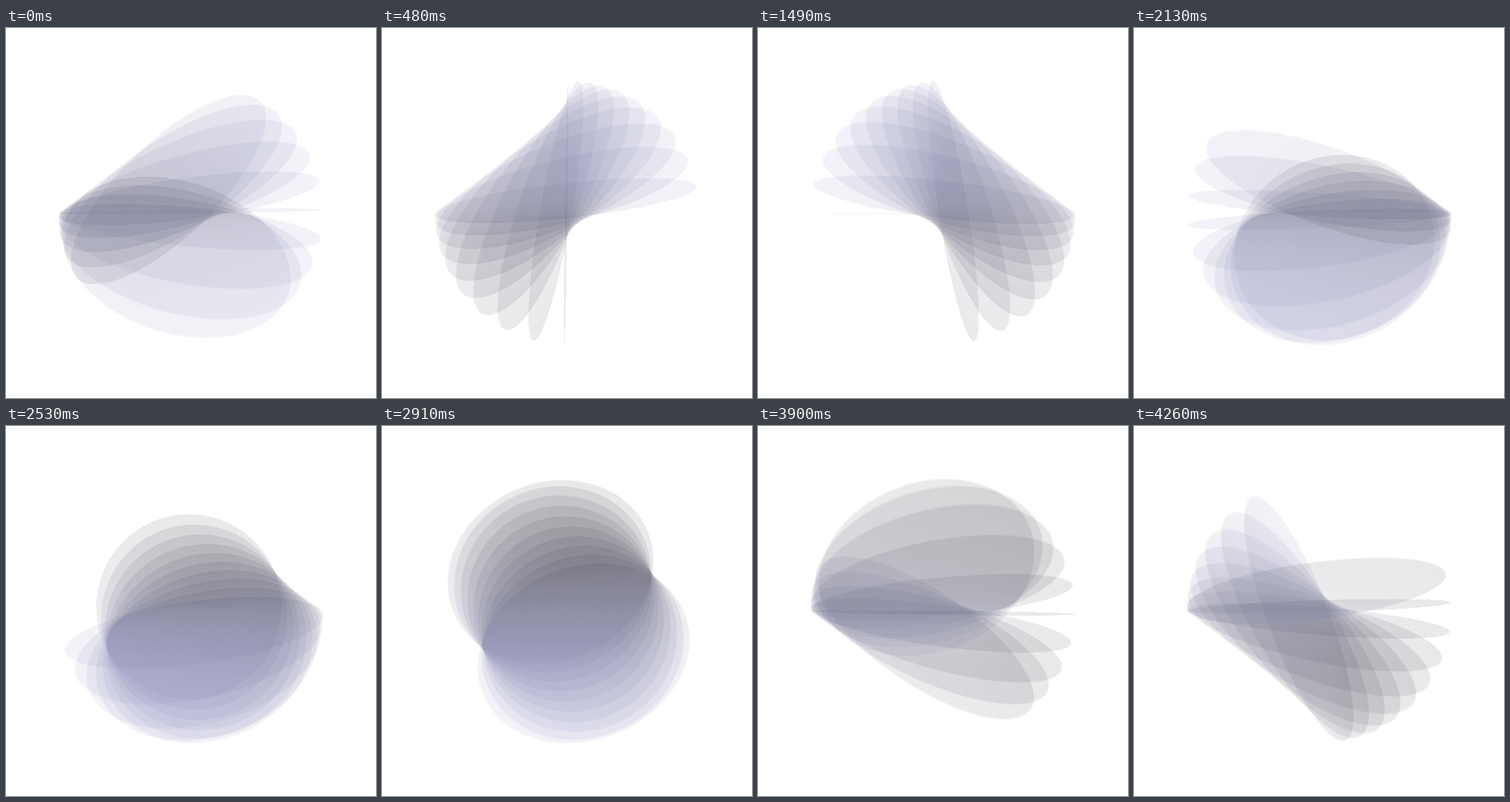
An HTML page that plays this animation: 480x480 px, repeating every 4.3 s.

```html
<!DOCTYPE html>
<html lang="en">
<head>
<meta charset="utf-8">
<title>Turning discs</title>
<style>
  html, body {
    margin: 0;
    width: 100%;
    height: 100%;
    overflow: hidden;
    background: #fff;
  }

  #stage {
    position: absolute;
    inset: 0;
    overflow: hidden;
    perspective: 168px;
    perspective-origin: 240px 240px;
  }

  /* Drawn at double size and halved, so near edges stay sharp. */
  .disc {
    position: absolute;
    left: 0;
    top: 0;
    width: 480px;
    height: 480px;
    border-radius: 50%;
    background: linear-gradient(rgb(40 40 50 / .1), rgb(130 130 190 / .1));
    animation: turn 4300ms linear infinite;
  }

  /* --lag is the disc's delay in degrees; the Y turn runs at half speed. */
  @keyframes turn {
    from {
      transform: rotateY(calc(67.95deg - var(--lag) / 2)) rotateX(calc(135.9deg - var(--lag))) scale(.5);
    }
    to {
      transform: rotateY(calc(261.45deg - var(--lag) / 2)) rotateX(calc(522.9deg - var(--lag))) scale(.5);
    }
  }
</style>
</head>
<body>
<div id="stage"></div>
<script>
  const DISCS = 10;
  const STEP = 9;
  const stage = document.getElementById('stage');

  for (let i = 0; i < DISCS; i++) {
    const disc = document.createElement('div');
    disc.className = 'disc';
    disc.style.setProperty('--lag', `${i * STEP}deg`);
    stage.append(disc);
  }
</script>
</body>
</html>
```
